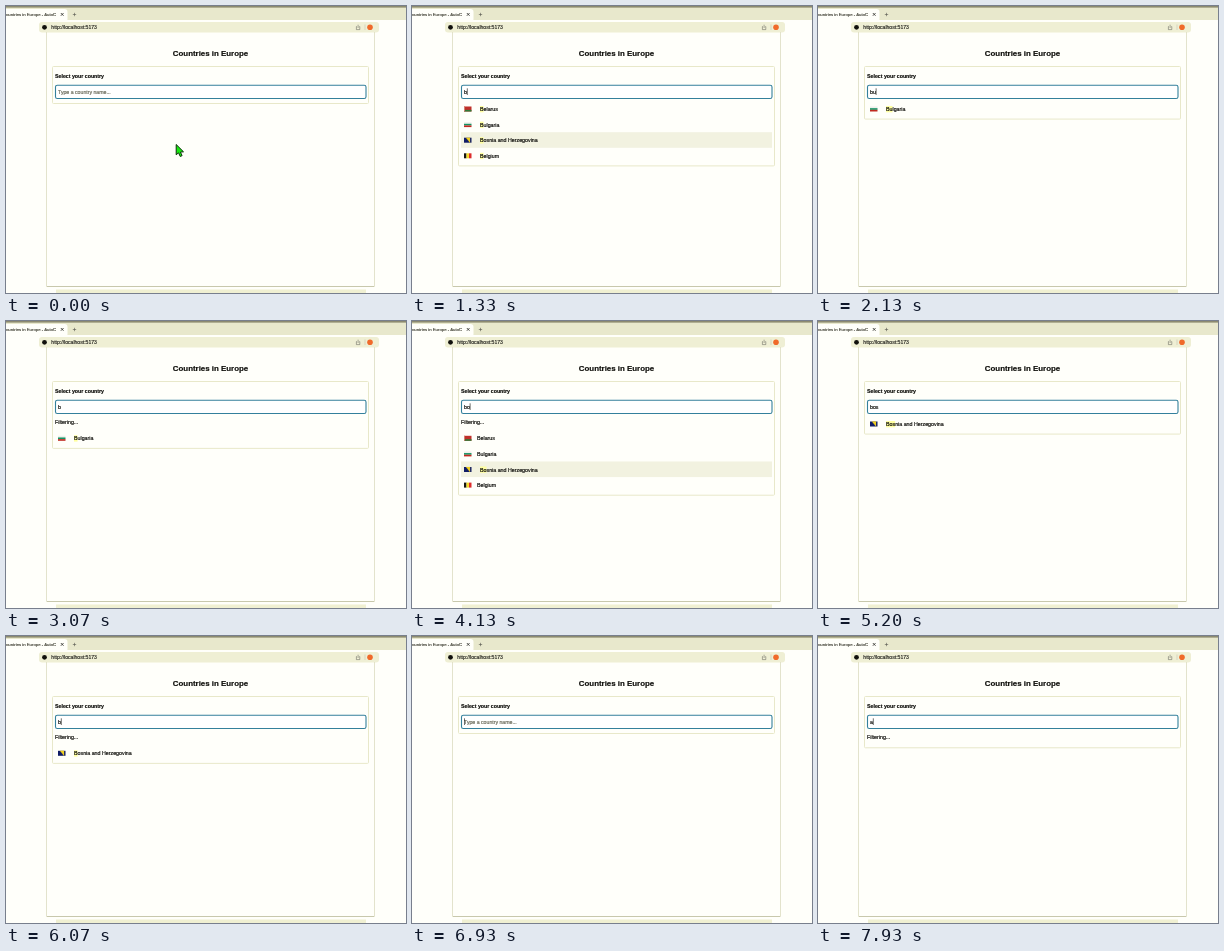
Animation, 400 px wide and 287 px high, one loop 8 s. Source, as an HTML page with a canvas:

```html
<!DOCTYPE html>
<html lang="en">
<head>
<meta charset="utf-8">
<title>Countries in Europe</title>
<style>
  html, body { margin: 0; width: 100%; height: 100%; overflow: hidden; background: #fffffa; }
  canvas { display: block; width: 400px; height: 287px; }
</style>
</head>
<body>
<canvas id="stage" width="400" height="287"></canvas>
<script>
const ctx = document.getElementById('stage').getContext('2d');
const LOOP = 8000;
const PAGE = '#fffffa';
const INK = '#10100c';
const ICON = '#585850';
const LINE = '#e6e6c4';
const ROW = 15.6;
const COUNTRIES = ['Belarus', 'Bulgaria', 'Bosnia and Herzegovina', 'Belgium'];
const ALL = [0, 1, 2, 3];

// Start time, typed query, whether results are pending, listed countries
const STATES = [
  [0, '', false, []],
  [600, 'b', true, []],
  [1200, 'b', false, ALL],
  [1530, 'bu', true, ALL],
  [2130, 'bu', false, [1]],
  [2730, 'b', true, [1]],
  [3330, 'b', false, ALL],
  [4070, 'bo', true, ALL],
  [4270, 'bos', true, ALL],
  [4870, 'bos', false, [2]],
  [5330, 'bo', true, [2]],
  [5670, 'b', true, [2]],
  [6270, 'b', false, ALL],
  [6930, '', false, []],
  [7870, 'a', true, []]
];

function rect(x, y, w, h, color) {
  ctx.fillStyle = color;
  ctx.fillRect(x, y, w, h);
}

function box(x, y, w, h, r, stroke, fill, width = 1) {
  ctx.beginPath();
  ctx.roundRect(x, y, w, h, r);
  if (fill) { ctx.fillStyle = fill; ctx.fill(); }
  if (stroke) { ctx.strokeStyle = stroke; ctx.lineWidth = width; ctx.stroke(); }
}

function path(points, stroke, width, fill) {
  ctx.beginPath();
  points.forEach(([x, y], i) => i ? ctx.lineTo(x, y) : ctx.moveTo(x, y));
  if (fill) { ctx.closePath(); ctx.fillStyle = fill; ctx.fill(); }
  ctx.strokeStyle = stroke;
  ctx.lineWidth = width;
  ctx.stroke();
}

function dot(x, y, r, color) {
  ctx.beginPath();
  ctx.arc(x, y, r, 0, Math.PI * 2);
  ctx.fillStyle = color;
  ctx.fill();
}

function setFont(size, bold) {
  ctx.font = `${bold ? 'bold ' : ''}${size}px "Liberation Sans", Arial, sans-serif`;
}

// A hairline stroke gives the small type its slightly heavy weight
function text(str, x, y, size = 5.3, color = INK, bold = false) {
  setFont(size, bold);
  ctx.fillStyle = ctx.strokeStyle = color;
  ctx.lineWidth = 0.18;
  ctx.fillText(str, x, y);
  ctx.strokeText(str, x, y);
}

function browser() {
  rect(0, 0, 400, 287, PAGE);
  rect(0, 0, 400, 14, '#e8e8cc');
  rect(0, 0, 400, 1.6, '#8c8a70');
  box(-8, 3, 69.5, 13, 3, null, PAGE);
  text('ountries in Europe - AutoC', 0, 10.2, 4.25, '#4c4c40');
  path([[54.8, 7], [57.6, 9.8]], INK, 0.7);
  path([[57.6, 7], [54.8, 9.8]], INK, 0.7);
  path([[66.8, 8.5], [70.2, 8.5]], ICON, 0.6);
  path([[68.5, 6.8], [68.5, 10.2]], ICON, 0.6);

  rect(0, 14, 400, 2, PAGE);
  box(33, 16, 340, 10.5, 3, null, '#efefd4');
  dot(38.5, 21.3, 2.4, INK);
  text('http://localhost:5173', 45.3, 23.2, 5.1, '#2c2c26');
  path([[351, 20.6], [350.4, 20.6], [350.4, 23.6], [353.8, 23.6], [353.8, 20.6], [353.2, 20.6]], ICON, 0.5);
  path([[352.1, 22], [352.1, 18.7]], ICON, 0.5);
  path([[359, 18.5], [359, 24]], '#c4c4b0', 0.6);
  dot(364, 21.3, 2.8, '#f06a2a');

  path([[40.5, 26], [40.5, 280.5], [368.5, 280.5], [368.5, 26]], '#dcdcc0', 0.8);
  rect(41, 280, 327, 1, '#c8c8ac');
  rect(50, 283.5, 310, 3.5, '#f0f0d2');
}

function flag(index, x, y) {
  const w = 7.5, h = 5;
  if (index === 0) {
    rect(x, y, w, h, '#c0302a');
    rect(x, y + 3.4, w, 1.6, '#2f7a36');
    rect(x, y, 1, h, '#d08070');
  } else if (index === 1) {
    ['#f0f0ec', '#149464', '#c02a20'].forEach((c, i) => rect(x, y + i * h / 3, w, h / 3, c));
  } else if (index === 2) {
    rect(x, y, w, h, '#101c66');
    path([[x + 2, y], [x + 6, y], [x + 6, y + h]], '#f0d020', 0.2, '#f0d020');
  } else {
    ['#151510', '#f4d82a', '#dc2c2c'].forEach((c, i) => rect(x + i * w / 3, y, w / 3, h, c));
  }
}

function row(index, query, top) {
  const name = COUNTRIES[index];
  const matches = name.toLowerCase().startsWith(query);
  const x = matches ? 68 : 65;
  flag(index, 52, top + 4);
  if (matches) {
    setFont(5.3);
    rect(x, top + 3.5, ctx.measureText(name.slice(0, query.length)).width, 6.3, '#ffffa0');
  }
  text(name, x, top + 8.5);
}

function caretVisible(t, keyTime) {
  const blink = ((t - 6935) % 1200 + 1200) % 1200;
  return t > 130 && (t - keyTime < 300 || blink < 600);
}

function pointer(x, y) {
  ctx.save();
  ctx.translate(x, y);
  path([[0, 0], [0, 10.3], [2.3, 8.3], [4.1, 12], [5.9, 11.1], [4.2, 7.6], [7.3, 7.3]],
    '#0c300a', 1, '#18e810');
  ctx.restore();
}

function draw(t) {
  const [start, query, pending, rows] = STATES.findLast(s => s[0] <= t);
  const listTop = 96.5 + (pending ? 14.3 : 0);
  const bottom = listTop + 1 + rows.length * ROW;

  browser();
  text('Countries in Europe', 166.8, 50.2, 7.9, INK, true);
  box(46.5, 60.5, 316, bottom - 60.5, 1, LINE, null, 0.9);
  text('Select your country', 49, 72.3, 5.25, INK, true);
  box(49.5, 79.3, 310.5, 13.2, 1.8, '#34809c', '#ffffff', 1.1);

  text(query || 'Type a country name...', 52, 87.7, 5.2, query ? INK : '#6c6c5c');
  if (caretVisible(t, start)) {
    setFont(5.2);
    rect(52 + ctx.measureText(query).width, 82.3, 0.6, 6.7, INK);
  }
  if (pending) text('Filtering...', 49, 102.8);

  rows.forEach((index, i) => {
    const top = listTop + i * ROW;
    if (index === 2 && rows.length > 1) rect(49, top - 1.5, 311, ROW, '#f2f2e0');
    row(index, query, top);
  });

  if (t < 600) pointer(170.2, 138.5);
}

function frame() {
  draw(performance.now() % LOOP);
  requestAnimationFrame(frame);
}
frame();
</script>
</body>
</html>
```
